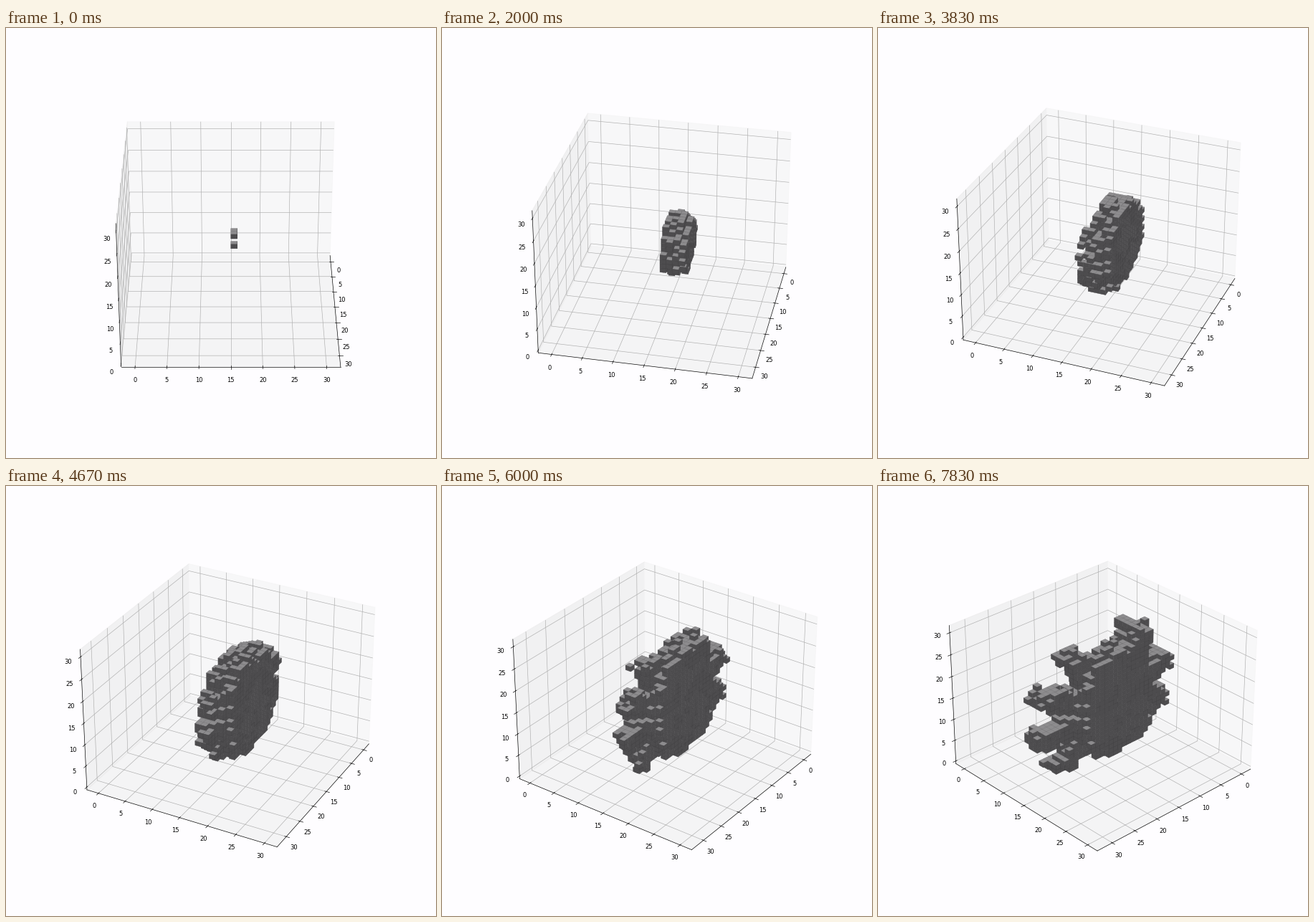
These frames come from a looping animation (600 by 600 pixels, 8 s). A matplotlib script:

```python
import numpy as np
import matplotlib.pyplot as plt
from matplotlib.animation import FuncAnimation
from mpl_toolkits.mplot3d.art3d import Poly3DCollection

FRAMES = 48
SHAPE = (31, 30, 31)
SEEDS = [(15, 15, 17), (16, 15, 17), (15, 15, 14)]
BACKGROUND = "#fefdff"
DARK = ("#4d4c4e", "#444345")
LIGHT = ("#8d8c8e", "#747375")
SQUARE = [(0, 0), (1, 0), (1, 1), (0, 1)]


def branches():
    """Two fans in the x-z plane: even ones forward, shrinking ones back."""
    for k in range(4):
        yield 61 - 36 * k, 16.5
        yield 113 + 40 * k, 17 / (1 + 0.2 * k)


def growth_radius():
    """Radius at which each cell appears; infinite outside the body."""
    rng = np.random.default_rng(5)
    noise = rng.random(SHAPE)
    x, y, z = np.indices(SHAPE)
    dx, dz = x - 15, z - 15
    r = np.hypot(dx, dz)
    low = 15.5 - 0.17 * r

    oval = (np.abs(dx + 0.5) / 8) ** 2.5 + (np.abs(dz - 1) / 11.5) ** 2.5
    oval += ((y - 16.3) / 3.2) ** 4
    solid = (oval + 0.4 * (noise - 0.5) < 1) & (y >= low) & (y <= 18)

    high = np.where(dx > 0, 18.5 - 0.17 * r, 18)
    reach = (y >= low + 0.6 * (noise - 0.5)) & (y <= high)
    for angle, length in branches():
        c, s = np.cos(np.radians(angle)), np.sin(np.radians(angle))
        along, across = dx * c + dz * s, np.abs(dz * c - dx * s)
        width = 2 + 0.08 * (length - along)
        solid |= (reach & (along > 0) & (along + 1.5 * noise < length)
                  & (across + noise < width))

    grow = np.maximum(r + 2.2 * (noise - 0.4) + 0.3 * np.abs(y - 16), 1.6)
    grow[~solid] = np.inf
    for cell in SEEDS:
        grow[cell] = 0
    return grow


def cube_sides(solid):
    """Exposed quads facing the viewer, with fill and edge colours."""
    quads, shades = [], []
    for axis in range(3):
        # A side is hidden when the next cell along the axis is filled.
        ahead = np.roll(solid, -1, axis)
        np.moveaxis(ahead, axis, 0)[-1] = False
        cells = np.argwhere(solid & ~ahead)
        corners = np.insert(SQUARE, axis, 1, axis=1)
        quads.append(cells[:, None, :] + corners)
        shades += [LIGHT if axis == 2 else DARK] * len(cells)
    fills, edges = zip(*shades)
    return np.concatenate(quads), fills, edges


GROW = growth_radius()

fig = plt.figure(figsize=(10, 10), dpi=60, facecolor=BACKGROUND)
ax = fig.add_subplot(projection="3d", facecolor=BACKGROUND)
ax.set_xlim(-2.26, 33.26)
ax.set_ylim(-2.19, 32.19)
ax.set_zlim(-0.65, 31.65)
for axis in (ax.xaxis, ax.yaxis, ax.zaxis):
    axis.set_ticks(range(0, 31, 5))

cubes = []


def draw(i):
    while cubes:
        cubes.pop().remove()
    quads, fills, edges = cube_sides(GROW < 1.5 + 0.34 * i)
    cubes.append(ax.add_collection3d(
        Poly3DCollection(quads, facecolors=fills, edgecolors=edges, linewidths=0.5)))
    ax.view_init(elev=30, azim=int(1.025 * i))
    return cubes


anim = FuncAnimation(fig, draw, frames=FRAMES, init_func=lambda: draw(0),
                     interval=8000 / FRAMES, repeat=True, repeat_delay=0, blit=False)
plt.show()
```
